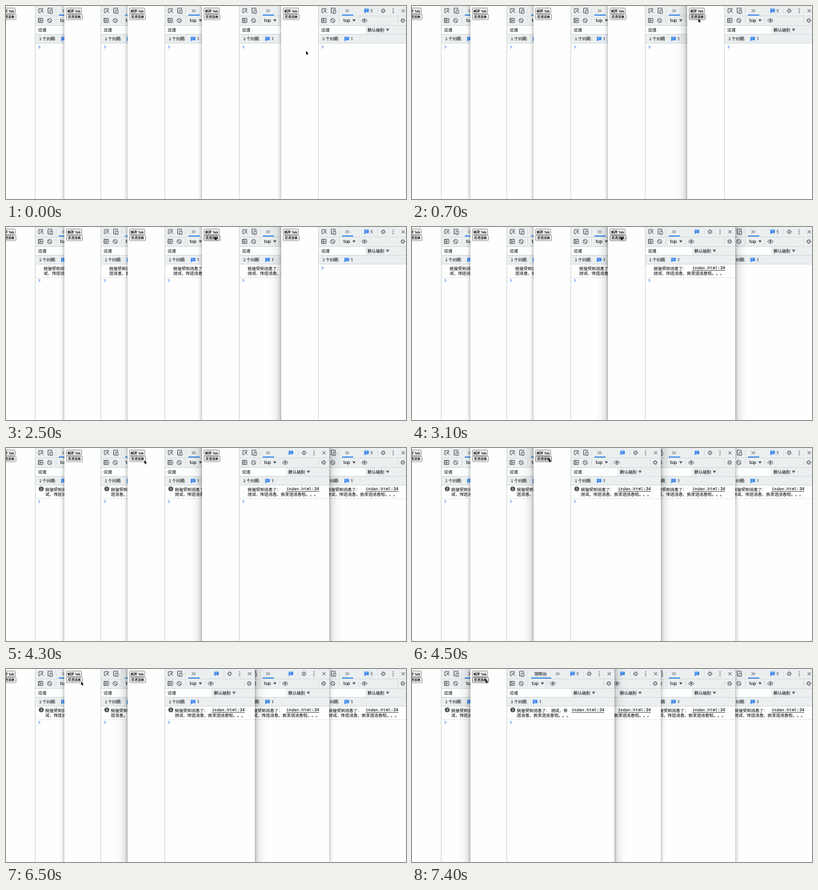
Write an HTML page that moves like this. It is 500 px wide and 242 px high and loops after 8 s.

```html
<!DOCTYPE html>
<html>
<head>
<meta charset="utf-8">
<title>Cross-tab messages</title>
<style>
  html, body { margin: 0; width: 100%; height: 100%; overflow: hidden; background: #fff; }
  #stage { position: relative; width: 500px; height: 242px; overflow: hidden; }
  /* Windows overshoot the stage so only their side shadows show. */
  .window { position: absolute; top: -20px; height: 282px; background: #fdfefd; overflow: hidden;
            box-shadow: 0 0 5px rgba(0, 0, 0, .4); }
  .window.front { box-shadow: 0 0 4px rgba(0, 0, 0, .35), 0 0 14px rgba(0, 0, 0, .28); }
  .window svg { position: absolute; left: 0; top: 20px; }
  #cursor { position: absolute; left: 0; top: 0; z-index: 20; overflow: visible; }
  text { font: 5.2px "Noto Sans CJK SC", "Noto Sans CJK", "Noto Sans", sans-serif; fill: #2c2f32;
         stroke: #2c2f32; stroke-width: .1; white-space: pre;
         text-rendering: geometricPrecision; text-spacing-trim: space-all; }
  .button text { font-size: 4.1px; fill: #000; stroke: #000; text-anchor: middle; }
  .button rect { fill: #f0f0f0; stroke: #777; stroke-width: .6; }
  .button.hover rect { fill: #e2e2e2; stroke: #555; }
  .latin { font-family: Roboto, Arial, sans-serif; }
  .context { font-family: Roboto, Arial, sans-serif; font-size: 6px; }
  .count { font-family: Roboto, Arial, sans-serif; font-size: 4.6px; text-anchor: middle; fill: #fff; stroke: none; }
  .link { font-family: "DejaVu Sans Mono", monospace; font-size: 5.25px; text-anchor: end; text-decoration: underline; }
  .line { stroke: #d2d8d9; stroke-width: .7; fill: none; }
  .faint { stroke: #e6eaea; stroke-width: .7; }
  .split { stroke: #d8dfda; stroke-width: 1; }
  .icon { stroke: #484c50; stroke-width: .8; fill: none; }
  .solid { fill: #484c50; }
  .blue { fill: #1a73e8; }
  .etch { stroke: #fff; stroke-width: .5; }
  .prompt { stroke: #367cf1; stroke-width: 1; fill: none; }
</style>
</head>
<body>
<div id="stage">
  <svg id="cursor" width="6" height="8">
    <path d="M0 0V5.8L1.4 4.6 2.3 6.6 3.2 6.2 2.4 4.3H4.2Z" transform="scale(.75)" fill="#000"/>
  </svg>
</div>
<script>
const LOOP = 8000, STEP = 100;

const windows = [
  { x: -10, split: 46, width: 168, lines: ['我接受到消息了： 测', '试，传送消息，我发送消息啦。。。'], badge: true },
  { x: 73, split: 45, width: 180, lines: ['我接受到消息了： 测试，传', '送消息，我发送消息啦。。。'], badge: true, tab: true },
  { x: 152, split: 46, width: 159, lines: ['我接受到消息了：', '测试，传送消息，我发送消息啦。。。'] },
  { x: 245, split: 46, width: 159, lines: ['我接受到消息了：', '测试，传送消息，我发送消息啦。。。'] },
  { x: 344, split: 46, width: 159, lines: ['我接受到消息了：', '测试，传送消息，我发送消息啦。。。'], badge: true }
];
const sends = [[1200, 4], [3200, 3], [5200, 2], [7400, 1]];
const raises = [[100, 4], [2600, 3], [4500, 2], [6700, 1]];
const cursorPath = [
  [200, 375, 56.5], [700, 358, 16], [1100, 357, 13],
  [1600, 357, 13], [1900, 325, 19], [2300, 262, 14], [2500, 261, 12],
  [3600, 261, 12], [4000, 215, 17], [4300, 173, 15.5], [4500, 171, 13],
  [5800, 171, 13], [6100, 145, 17], [6500, 94, 16], [6700, 92, 13]
];

const text = (x, y, value, cls = '') => `<text x="${x}" y="${y}" class="${cls}">${value}</text>`;
const path = (d, cls) => `<path d="${d}" class="${cls}"/>`;
const rect = (x, y, w, h, fill, cls = '') =>
  `<rect x="${x}" y="${y}" width="${w}" height="${h}" rx=".8" fill="${fill}" class="${cls}"/>`;
const circle = (x, y, r, cls, dash = 'none') =>
  `<circle cx="${x}" cy="${y}" r="${r}" class="${cls}" stroke-dasharray="${dash}"/>`;
const button = (cls, y, w, h, label) =>
  `<g class="button ${cls}">${rect(2.5, y, w, h, '')}${text(2.5 + w / 2, y + h / 2 + 1.5, label)}</g>`;
const bubble = (x, y) => path(`M${x} ${y - 2.5}h5.4v4h-3.7l-1.7 1.5z`, 'blue') +
  path(`M${x + 1} ${y - 1.2}h3.4m-3.4 1.3h2.3`, 'etch');
const caret = (x, y) => path(`M${x} ${y - 1.3}h4l-2 3z`, 'solid');
const gear = (x, y) => circle(x, y, 1.7, 'icon') + circle(x, y, 2.5, 'icon', '.98');

function topRow(s, w, win) {
  const tab = win.tab
    ? text(s + 35, 8, '控制台') + path(`M${s + 31} 10.7h25v1.2h-25z`, 'blue')
    : path(`M${s + 30} 10.7h14v1.2h-14z`, 'blue');
  const more = s + (win.tab ? 62 : 34.5);
  const issues = win.badge
    ? rect(w - 57, 2, 14, 8, '#e4eaf0') + bubble(w - 55, 6) + text(w - 47.5, 8, '1', 'latin')
    : bubble(w - 50.5, 6);
  const dots = [3.6, 6, 8.4].map(y => circle(w - 19, y, .7, 'solid')).join('');
  return path(`M${s + 10} 5V3.3h-5v5h2M${s + 8} 5.6l3 3m-3 -1v-2h2`, 'icon') +
    path(`M${s + 16.5} 8.8v-6h5v1.5M${s + 16.5} 8.8h2M${s + 19} 5.2h3v4h-3z`, 'icon') +
    path(`M${s + 26.5} 2.5v7`, 'line') + tab +
    path(`M${more} 4.2l1.8 1.8-1.8 1.8m2.4 -3.6l1.8 1.8-1.8 1.8`, 'icon') +
    issues + path(`M${w - 38.5} 2.5v7`, 'line') + gear(w - 31.5, 6) + dots +
    path(`M${w - 8.5} 4l4 4m0 -4l-4 4`, 'icon');
}

function consoleBars(s, w) {
  return path(`M${s + 4.5} 15.5h5.5v5.2h-5.5zM${s + 6.2} 15.5v5.2`, 'icon') +
    path(`M${s + 7.3} 16.7l1.8 1.4-1.8 1.4z`, 'solid') +
    circle(s + 18.5, 18.2, 2.6, 'icon') + path(`M${s + 16.7} 16.4l3.6 3.6`, 'icon') +
    path(`M${s + 26.5} 14.5v7`, 'line') + text(s + 31.5, 20, 'top', 'context') + caret(s + 43, 18) +
    path(`M${s + 51} 14.5v7M${w - 13} 14.5v7`, 'line') +
    path(`M${s + 54.5} 18.2q3.5 -4.4 7 0q-3.5 4.4 -7 0z`, 'icon') +
    circle(s + 58, 18.2, 1.1, 'solid') + gear(w - 7, 18.2) +
    rect(s + 1.5, 25, w - s - 55.5, 10, '#fdfefe') + text(s + 4, 32, '过滤') +
    text(w - 51, 31.8, '默认级别') + caret(w - 28, 29.7) +
    text(s + 5.5, 43.1, '1 个问题:') +
    rect(s + 31, 37.6, 14, 7.6, '#e6ecf2') + bubble(s + 33.2, 41.3) + text(s + 41, 43.2, '1', 'latin');
}

function markup(win) {
  const s = win.split, w = win.width;
  return `<svg width="${w}" height="242">` +
    button('', 2.5, 19, 7, '新开 Tab') + button('send', 10.5, 20, 6.6, '发送消息') +
    rect(s, -2, w - s + 2, 49, '#ebeff0') + topRow(s, w, win) + consoleBars(s, w) +
    path([12.5, 24.5, 35.5, 46.5].map(y => `M${s} ${y}H${w}`).join(''), 'line') +
    path(`M${s + .5} 0V242`, 'split') +
    `<g class="message"><g class="counter">${circle(s + 8, 51.3, 3, 'solid')}${text(s + 8, 53, '', 'count')}</g>` +
    `<g class="body">${text(0, 53.5, win.lines[0])}${text(0, 60.2, win.lines[1])}</g>` +
    text(w - 12.5, 53.3, 'index.html:34', 'link') + path(`M${s} 63.5H${w}`, 'faint') + '</g>' +
    path(`M${s + 4.8} 49.7l1.7 1.7-1.7 1.7`, 'prompt') + '</svg>';
}

const stage = document.getElementById('stage');
const cursor = document.getElementById('cursor');
for (const win of windows) {
  const el = win.el = document.createElement('div');
  el.className = 'window';
  el.style.left = win.x + 'px';
  el.style.width = win.width + 'px';
  el.innerHTML = markup(win);
  stage.append(el);
  for (const part of ['send', 'message', 'counter', 'body', 'prompt']) win[part] = el.querySelector('.' + part);
}

function cursorAt(t) {
  const next = cursorPath.findIndex(point => point[0] > t);
  if (next === 0) return cursorPath[0].slice(1);
  if (next < 0) return cursorPath.at(-1).slice(1);
  const [t0, x0, y0] = cursorPath[next - 1], [t1, x1, y1] = cursorPath[next];
  const k = (t - t0) / (t1 - t0);
  return [x0 + (x1 - x0) * k, y0 + (y1 - y0) * k];
}

function render(t) {
  const [x, y] = cursorAt(t);
  cursor.style.transform = `translate(${x}px, ${y}px)`;
  const raised = raises.filter(([at]) => at <= t).map(([, index]) => index);
  windows.forEach((win, i) => {
    const count = sends.filter(([at, from]) => at <= t && from !== i).length;
    const order = raised.indexOf(i);
    win.el.style.zIndex = order < 0 ? i + 1 : 10 + order;
    win.el.classList.toggle('front', raised.at(-1) === i);
    win.message.style.display = count ? '' : 'none';
    win.counter.style.display = count > 1 ? '' : 'none';
    win.counter.lastChild.textContent = count;
    win.body.setAttribute('transform', `translate(${win.split + (count > 1 ? 13 : 11)} 0)`);
    win.prompt.setAttribute('transform', `translate(0 ${count ? 15.6 : 0})`);
    win.send.classList.toggle('hover', x > win.x + 2 && x < win.x + 20.5 && y > 10 && y < 17.2);
  });
}

const start = performance.now();
function tick() {
  const t = (performance.now() - start) % LOOP;
  render(Math.floor(t / STEP) * STEP);
  requestAnimationFrame(tick);
}
tick();
</script>
</body>
</html>
```
